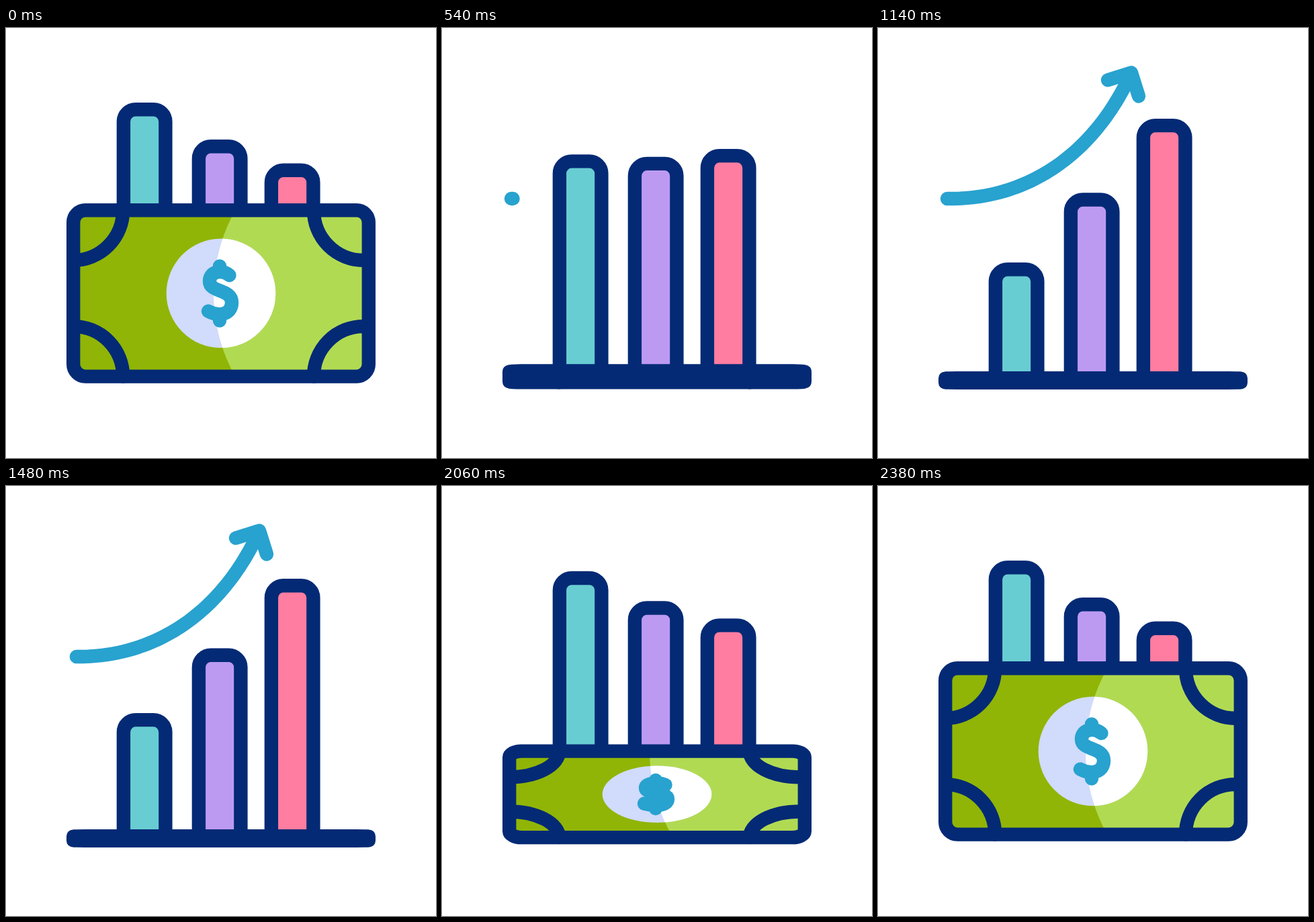
Write an HTML page with a canvas that moves like this. It is 640x640 px and loops after 2.4 s.

```html
<!DOCTYPE html>
<html lang="en">
<head>
<meta charset="utf-8">
<title>Money and growth</title>
<style>
  html, body { margin: 0; width: 100%; height: 100%; overflow: hidden; background: #fff; }
  canvas { display: block; width: 640px; height: 640px; }
</style>
</head>
<body>
<canvas id="stage" width="640" height="640"></canvas>
<script>
const LOOP = 2400;
const STROKE = 20.4;
const NAVY = '#042a75', BLUE = '#28a2cf';
const DARK = '#90b506', LIGHT = '#b1da53', SHADE = '#d1dbfb';
const LEFT = 100.2, RIGHT = 539.8, TOP = 271.2, HEIGHT = 247.4;

// left edge, top at rest, top when charted
const BARS = [
  { x: 174.9, from: 121.2, to: 359.6, fill: '#68cdd2' },
  { x: 286.9, from: 176.2, to: 255.6, fill: '#bc9af2' },
  { x: 394.9, from: 211.8, to: 145.0, fill: '#ff7da0' }
];
const CURVE = [[103, 254], [215, 256], [318, 195], [376.5, 68]];
const HEAD = [[342, 77.5], [377, 66.5], [388, 101.5]];

const ctx = document.getElementById('stage').getContext('2d');
const lerp = (a, b, t) => a + (b - a) * t;

// cubic-bezier(.75, 0, .25, 1)
function ease(x) {
  if (x <= 0) return 0;
  if (x >= 1) return 1;
  let lo = 0, hi = 1;
  for (let i = 0; i < 24; i++) {
    const s = (lo + hi) / 2, r = 1 - s;
    if (2.25 * s * r * r + 0.75 * s * s * r + s * s * s < x) lo = s; else hi = s;
  }
  return lo * lo * (3 - 2 * lo);
}
const span = (t, a, b) => ease((t - a) / (b - a));

function stroke(color) {
  ctx.strokeStyle = color;
  ctx.lineWidth = STROKE;
  ctx.stroke();
}

function drawBar({ x, from, to, fill }, p, base) {
  const y = lerp(from, to, p), w = 62.5, r = 18;
  ctx.beginPath();
  ctx.moveTo(x, base);
  ctx.lineTo(x, y + r);
  ctx.quadraticCurveTo(x, y, x + r, y);
  ctx.arcTo(x, y, x + r, y, 0);
  ctx.beginPath();
  ctx.moveTo(x, base);
  ctx.arcTo(x, y, x + w, y, r);
  ctx.arcTo(x + w, y, x + w, base, r);
  ctx.lineTo(x + w, base);
  ctx.fillStyle = fill;
  ctx.fill();
  ctx.lineCap = 'butt';
  stroke(NAVY);
}

// Fill the current path in two tones split by a fixed arc
function twoTone(left, right) {
  ctx.save();
  ctx.fillStyle = left;
  ctx.fill();
  ctx.clip();
  ctx.beginPath();
  ctx.arc(563, 395, 254, 0, 7);
  ctx.rect(500, 200, 140, 360);
  ctx.fillStyle = right;
  ctx.fill();
  ctx.restore();
}

function billPath(top, h, k) {
  const rx = 18, ry = 18 * k, bottom = top + h;
  ctx.beginPath();
  ctx.ellipse(LEFT + rx, top + ry, rx, ry, 0, Math.PI, Math.PI * 1.5);
  ctx.ellipse(RIGHT - rx, top + ry, rx, ry, 0, -Math.PI / 2, 0);
  ctx.ellipse(RIGHT - rx, bottom - ry, rx, ry, 0, 0, Math.PI / 2);
  ctx.ellipse(LEFT + rx, bottom - ry, rx, ry, 0, Math.PI / 2, Math.PI);
  ctx.closePath();
}

function drawDollar(Y) {
  const curve = (a, b, c, d, e, f) => ctx.bezierCurveTo(a, Y(b), c, Y(d), e, Y(f));
  ctx.beginPath();
  ctx.moveTo(332.5, Y(368));
  curve(321, 359, 303, 362, 303, 377);
  curve(303, 394, 336, 388, 336, 408.5);
  curve(336, 428, 315, 429, 301, 421.5);
  ctx.moveTo(318, Y(354.5));
  ctx.lineTo(318, Y(363));
  ctx.moveTo(318, Y(427));
  ctx.lineTo(318, Y(435.5));
  stroke(BLUE);
}

function drawCorners(top, h, k) {
  const r = 74, ry = 74.5 * k, bottom = top + h, q = Math.PI / 2, cx = 532;
  ctx.beginPath();
  ctx.ellipse(LEFT, top, r, ry, 0, 0, q);
  ctx.moveTo(LEFT, bottom - ry);
  ctx.ellipse(LEFT, bottom, r, ry, 0, -q, 0);
  ctx.moveTo(RIGHT, top + ry);
  ctx.ellipse(cx, top, r, ry, 0, q, 2 * q);
  ctx.moveTo(cx - r, bottom);
  ctx.ellipse(cx, bottom, r, ry, 0, 2 * q, 3 * q);
  ctx.lineTo(RIGHT, bottom - ry);
  stroke(NAVY);
}

function drawBill(top, h) {
  const k = h / HEIGHT, Y = y => top + (y - TOP) * k;
  ctx.lineCap = ctx.lineJoin = 'round';
  billPath(top, h, k);
  twoTone(DARK, LIGHT);
  ctx.beginPath();
  ctx.ellipse(320, Y(394.8), 81.3, 81.3 * k, 0, 0, 7);
  twoTone(SHADE, '#fff');
  drawDollar(Y);
  drawCorners(top, h, k);
  billPath(top, h, k);
  stroke(NAVY);
}

function curveAt(t) {
  const r = 1 - t, w = [r * r * r, 3 * r * r * t, 3 * r * t * t, t * t * t];
  return [0, 1].map(i => CURVE.reduce((sum, p, j) => sum + p[i] * w[j], 0));
}

function headAt(t) {
  const i = t < 0.5 ? 0 : 1, f = t * 2 - i;
  return [0, 1].map(j => lerp(HEAD[i][j], HEAD[i + 1][j], f));
}

function drawTrimmed(at, a, b) {
  if (b - a < 0.001) return;
  const n = 60;
  ctx.beginPath();
  ctx.moveTo(...at(a));
  for (let i = 1; i <= n; i++) {
    const t = i / n;
    if (t > a && t < b) ctx.lineTo(...at(t));
  }
  ctx.lineTo(...at(b));
  ctx.lineCap = ctx.lineJoin = 'round';
  stroke(BLUE);
}

function draw(t) {
  const grow = span(t, 0, 1200) - span(t, 1200, 2380);
  const flat = span(t, 0, 700) - span(t, 1740, 2380);
  const top = lerp(TOP, 521.2, flat);
  const h = lerp(HEIGHT, 6.6, flat);

  ctx.fillStyle = '#fff';
  ctx.fillRect(0, 0, 640, 640);
  for (const bar of BARS) drawBar(bar, grow, top);
  drawBill(top, h);
  drawTrimmed(curveAt, span(t, 1460, 1690), span(t, 500, 885));
  drawTrimmed(headAt, span(t, 1640, 1955), span(t, 700, 1000));
}

function tick() {
  draw(performance.now() % LOOP);
  requestAnimationFrame(tick);
}
tick();
</script>
</body>
</html>
```
